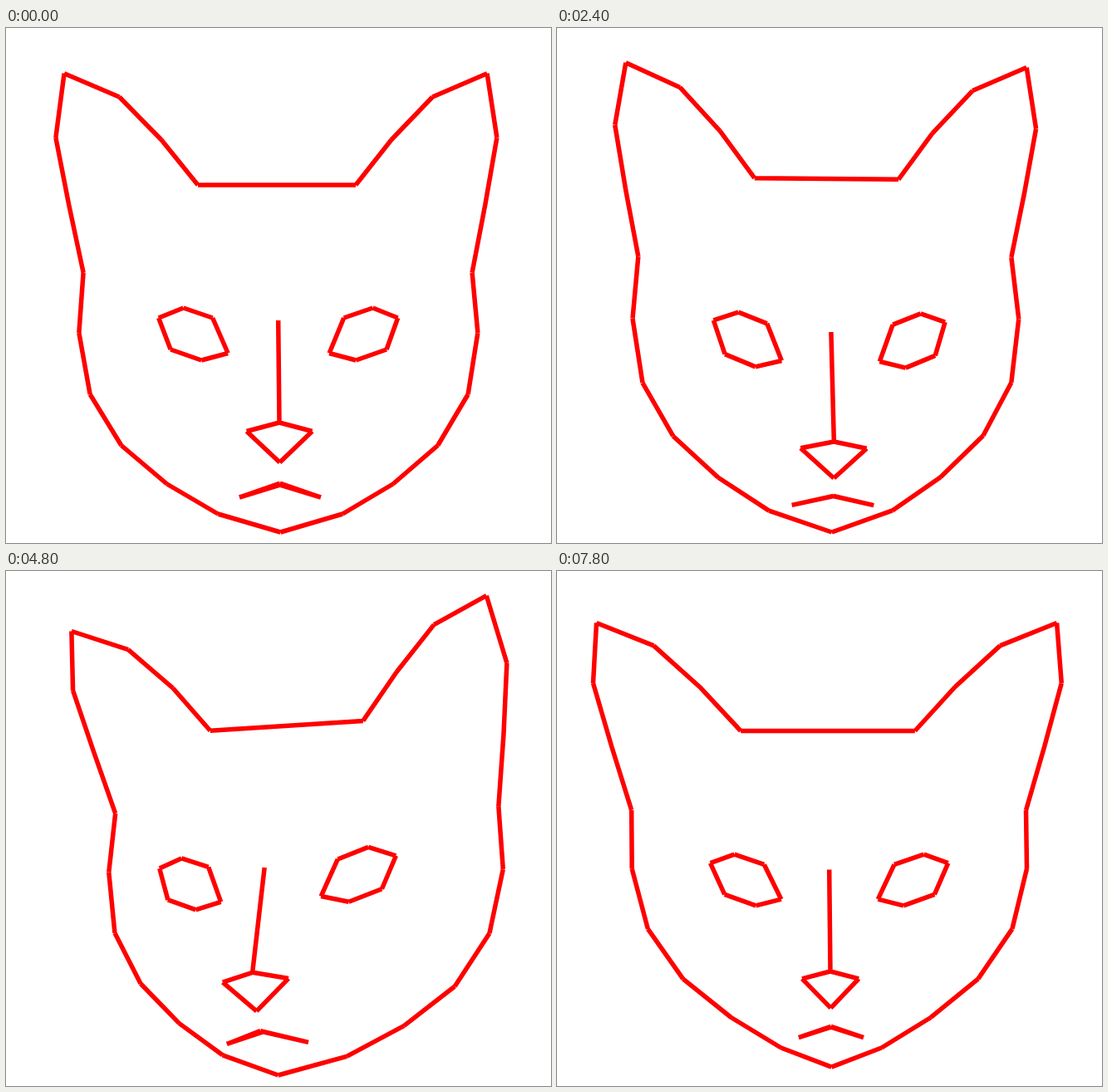
Write an HTML page with a canvas that moves like this. It is 656 px wide and 620 px high and loops after 8000 ms.

```html
<!DOCTYPE html>
<html lang="en">
<head>
<meta charset="utf-8">
<title>Cat face shape modes</title>
<style>
  html, body { margin: 0; height: 100%; overflow: hidden; background: #fff; }
  canvas { display: block; }
</style>
</head>
<body>
<canvas id="stage" width="656" height="620"></canvas>
<script>
const ctx = document.getElementById('stage').getContext('2d');
const STEP_MS = 200, LOOP_MS = 8000;

// Key points of the right half: distance from the face axis, height, depth.
const head = [
  [95, 189, 15], [138.5, 134.5, 18], [188.5, 83, 19], [254.5, 54.7, 20],
  [265.5, 132, 26], [250.5, 213, 31], [234, 294.5, 38], [240, 367, 34],
  [227.5, 441, 28], [190.5, 502.5, 23], [136, 549, 16], [75, 585, 8], [0, 607, 0],
];
const eye = [
  [144, 349, -8], [114, 337, -12], [79, 349, -15],
  [61, 391.5, -19], [93, 400, -17], [130, 387, -13],
];
const bridge = [[0, 352, -28], [0, 475, -46]];
const nose = [[0, 475, -46], [39.5, 485.5, -41], [0, 523, -38]];
const mouth = [[0, 548, -31], [49, 565, -19], [0, 550, -27]];

// Linear swing: 0, +peak, 0, -peak, 0 over four peaks' worth of steps.
function swing(step, start, peak) {
  const n = step - start;
  if (n < 0 || n > 4 * peak) return 0;
  return Math.abs((n + 3 * peak) % (4 * peak) - 2 * peak) - peak;
}

// Each motion acts on the whole face at once.
function poseAt(step) {
  const nod = swing(step, 0, 5) / 4;
  const turn = swing(step, 20, 4) / 4;
  return {
    pitch: nod - 0.18 * turn,
    yaw: turn + 0.27 * nod,
    stretch: swing(step, 36, 4) / 3,
  };
}

function project([x, y, z], side, { pitch, yaw, stretch }) {
  const axis = 324 + y / 95;
  const widen = Math.tanh(x / 80) *
    (pitch * (26 - 0.043 * y + 0.15 * z) + stretch * (27 - 0.08 * y));
  const shift = yaw * (6 + 0.8 * z - 0.00017 * (y - 380) ** 2);
  const roll = yaw * side * x * (z / 1000 + y / 5000 - 0.115);
  const lift = pitch * z + stretch * (15 - 0.041 * y - 0.25 * z);
  return [axis + side * (x + widen) + shift, y + roll + lift];
}

// Separate segments keep the notched corners.
function addLoop(points) {
  points.forEach((point, i) => {
    ctx.moveTo(...point);
    ctx.lineTo(...points[(i + 1) % points.length]);
  });
}

function draw(now) {
  const pose = poseAt(Math.floor(now % LOOP_MS / STEP_MS));
  const half = (part, side) => part.map(point => project(point, side, pose));
  ctx.fillStyle = '#fff';
  ctx.fillRect(0, 0, 656, 620);
  ctx.strokeStyle = '#f00';
  ctx.lineWidth = 5.5;
  ctx.beginPath();
  for (const part of [head, bridge, nose, mouth]) {
    addLoop([...half(part, 1), ...half(part, -1).reverse()]);
  }
  for (const side of [-1, 1]) addLoop(half(eye, side));
  ctx.stroke();
}

const origin = performance.now();
function tick() {
  draw(performance.now() - origin);
  requestAnimationFrame(tick);
}
tick();
</script>
</body>
</html>
```
